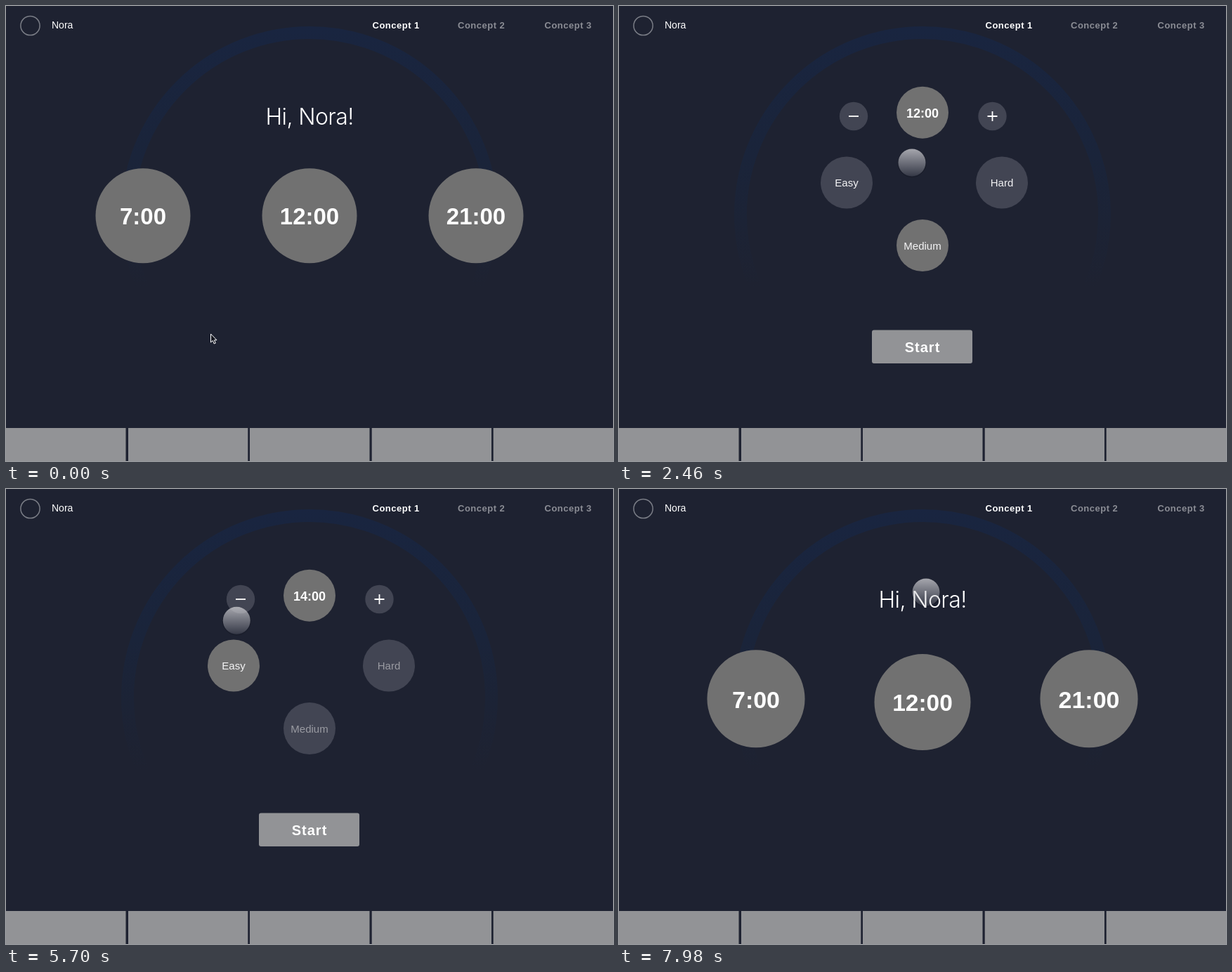
Write an HTML page that moves like this. It is 864x648 px and loops after 8000 ms.

```html
<!DOCTYPE html>
<html lang="en">
<head>
<meta charset="utf-8">
<title>Concept 1</title>
<style>
html, body { margin: 0; width: 100%; height: 100%; overflow: hidden; background: #1e2231; }
svg { display: block; width: 100vw; height: 100vh; }
text { font-family: "Liberation Sans", Arial, sans-serif; fill: #fff; }
.mid { text-anchor: middle; }
.nav { font-size: 13px; font-weight: 700; letter-spacing: .5px; }
.off { fill: #8b8d95; }
.hello { font: 300 32px Inter, Roboto, sans-serif; letter-spacing: -.6px; }
.time { font-size: 33px; font-weight: 700; }
.level { font-size: 15px; }
.start { font-size: 20px; font-weight: 700; letter-spacing: 1px; }
.sign { stroke: #fff; stroke-width: 1.8; fill: none; }
</style>
</head>
<body>
<svg viewBox="0 0 864 648" id="stage">
  <defs>
    <linearGradient id="arcFade" gradientUnits="userSpaceOnUse" x1="0" y1="30" x2="0" y2="400">
      <stop offset="0" stop-color="#192540"/>
      <stop offset=".5" stop-color="#1a243a"/>
      <stop offset="1" stop-color="#1e2231"/>
    </linearGradient>
    <linearGradient id="ballFill" x1="0" y1="0" x2="0" y2="1">
      <stop offset="0" stop-color="#c8c8cd" stop-opacity=".8"/>
      <stop offset="1" stop-color="#c8c8cd" stop-opacity=".14"/>
    </linearGradient>
  </defs>
  <rect width="864" height="648" fill="#1e2231"/>
  <path d="M173 297a259 259 0 0 1 518 0a259 259 0 0 1 -31 123M173 297a259 259 0 0 0 31 123" fill="none" stroke="url(#arcFade)" stroke-width="18"/>
  <circle cx="34.5" cy="28" r="13.6" fill="none" stroke="#7a7d86" stroke-width="1.5"/>
  <text x="65" y="32.3" font-size="14">Nora</text>
  <text class="nav" x="521.5" y="32.3">Concept 1</text>
  <text class="nav off" x="643" y="32.3">Concept 2</text>
  <text class="nav off" x="766.5" y="32.3">Concept 3</text>
  <g id="bars" fill="#929396"></g>
  <text id="hello" class="hello mid" x="432" y="168.5">Hi, Nora!</text>
  <g id="scene"></g>
  <g id="ball">
    <circle cy=".8" r="20" fill="none" stroke="#000" stroke-opacity=".16"/>
    <circle r="19.5" fill="url(#ballFill)"/>
    <circle id="rim" r="19" fill="none" stroke="#c4c4c8" stroke-width="1.3"/>
  </g>
  <path id="arrow" d="M0 0V12L2.8 9.5L4.7 14L6.8 13.1L5 8.8H8.5Z" fill="#14161f" stroke="#fff" stroke-width="1"/>
</svg>
<script>
const LOOP = 8000;
const $ = id => document.getElementById(id);
const clamp = v => Math.max(0, Math.min(1, v));
const part = (t, from, length) => clamp((t - from) / length);
const smooth = p => p * p * (3 - 2 * p);
const back = (p, s) => 1 + (s + 1) * (p - 1) ** 3 + s * (p - 1) ** 2;

function add(parent, tag, attrs, text = '') {
  const el = document.createElementNS('http://www.w3.org/2000/svg', tag);
  for (const key in attrs) el.setAttribute(key, attrs[key]);
  el.textContent = text;
  return parent.appendChild(el);
}

// A disc with an optional label, drawn around its own centre
function disc(x, y, r, fill, label, style, baseline) {
  const g = add($('scene'), 'g', {});
  const face = add(g, 'circle', { r, fill });
  const text = label && add(g, 'text', { class: style + ' mid', y: baseline }, label);
  return { g, face, text, x, y };
}

function place(item, scale, opacity = 1, y = item.y) {
  item.g.setAttribute('transform', `translate(${item.x} ${y}) scale(${Math.max(0, scale)})`);
  item.g.setAttribute('opacity', opacity);
}

const LIT = '#717171', DIM = '#424553';
for (const [x, w] of [[0, 170.5], [174, 170.3], [347, 170.5], [520.7, 170.3], [693.7, 170.3]])
  add($('bars'), 'rect', { x, y: 601, width: w, height: 47 });

const morning = disc(195, 298.7, 67.5, LIT, '7:00', 'time', 12.5);
const evening = disc(669, 298.7, 67.5, LIT, '21:00', 'time', 12.5);
const easy = disc(324, 251.5, 37, DIM, 'Easy', 'level', 5.5);
const hard = disc(545, 251.5, 37, DIM, 'Hard', 'level', 5.5);
const medium = disc(432, 341, 37, LIT, 'Medium', 'level', 5.5);
const minus = disc(334, 157, 20.2, DIM);
const plus = disc(531.5, 157, 20.2, DIM);
add(minus.g, 'path', { class: 'sign', d: 'M-7 0H7' });
add(plus.g, 'path', { class: 'sign', d: 'M-7 0H7M0 -7V7' });
const start = { g: add($('scene'), 'g', {}), x: 431.5, y: 485.2 };
add(start.g, 'rect', { x: -71.5, y: -23.7, width: 143, height: 47.4, rx: 3, fill: '#929396' });
add(start.g, 'text', { class: 'start mid', x: .5, y: 7.5 }, 'Start');
const noon = disc(432, 298.7, 67.5, LIT, '12:00', 'time', 12.5);
const setup = [easy, hard, medium, minus, plus, start];

// Pointer path: time, x, y
const path = [
  [0, 291, 467], [420, 291, 467], [540, 307, 457], [1200, 441, 371], [1320, 435.5, 334],
  [1560, 431, 302], [1800, 431, 302], [2460, 417, 223], [2570, 415, 217], [3060, 526.5, 157],
  [3360, 526.5, 157], [3700, 527, 155.5], [4200, 532, 165.5], [4700, 331, 256], [5400, 331, 257],
  [5880, 327, 155.5], [7000, 327, 155.5], [7520, 437, 147], [8000, 437, 147]
];
const presses = [1740, 3120, 3840, 4680, 5880, 6480, 7540];

// Monotone cubic through the path points
function along(t, axis) {
  let i = 0;
  while (i < path.length - 2 && t >= path[i + 1][0]) i++;
  const slope = n => path[n] && path[n + 1]
    ? (path[n + 1][axis] - path[n][axis]) / (path[n + 1][0] - path[n][0]) : 0;
  const tangent = n => {
    const a = slope(n - 1), b = slope(n);
    return a * b > 0 ? 2 * a * b / (a + b) : 0;
  };
  const [p, q] = [path[i], path[i + 1]];
  const d = q[0] - p[0], u = (t - p[0]) / d, h = smooth(u);
  return p[axis] * (1 - h) + q[axis] * h
    + d * (u * (1 - u) ** 2 * tangent(i) - u * u * (1 - u) * tangent(i + 1));
}

const pressed = t => Math.max(...presses.map(s => part(t, s, 60) * (1 - part(t, s + 180, 60))));

function hourAt(t) {
  if (t < 3240) return 12;
  if (t < 3960) return 13;
  if (t < 6000) return 14;
  return t < 6600 ? 13 : 12;
}

function drawPointer(t) {
  const x = along(t, 1), y = along(t, 2), push = pressed(t);
  const isArrow = t < 540;
  $('arrow').setAttribute('transform', `translate(${x + .5} ${y})`);
  $('arrow').setAttribute('visibility', isArrow ? 'visible' : 'hidden');
  $('ball').setAttribute('transform', `translate(${x} ${y}) scale(${1 - .05 * push})`);
  $('ball').setAttribute('visibility', isArrow ? 'hidden' : 'visible');
  $('rim').setAttribute('opacity', push * .75);
}

function draw(t) {
  const returning = t > 5000;

  const shift = returning ? 1 - back(part(t, 7680, 400), 1.05) : back(part(t, 1820, 560), 1.05);
  place(noon, 1 - .452 * shift, 1, 298.7 - 147 * shift);
  noon.text.textContent = hourAt(t) + ':00';

  const side = returning ? back(part(t, 7765, 270), 1.2) : 1 - smooth(part(t, 1780, 260));
  place(morning, side);
  place(evening, side);
  $('hello').setAttribute('opacity', returning ? part(t, 7800, 140) : 1 - part(t, 1780, 200));

  const shown = returning ? 1 - smooth(part(t, 7640, 150)) : back(part(t, 1960, 400), 1.2);
  for (const item of setup) place(item, item === start ? 1 : shown, clamp(shown));

  const pick = part(t, 4860, 120) > .4;
  easy.face.setAttribute('fill', pick ? LIT : DIM);
  medium.face.setAttribute('fill', pick ? DIM : LIT);
  easy.text.style.fill = '#f4f4f5';
  hard.text.style.fill = pick ? '#9a9ba2' : '#f0f0f2';
  medium.text.style.fill = pick ? '#9a9ba2' : '#f4f4f5';

  drawPointer(t);
}

const begin = performance.now();
function tick() {
  draw((performance.now() - begin) % LOOP);
  requestAnimationFrame(tick);
}
tick();
</script>
</body>
</html>
```
